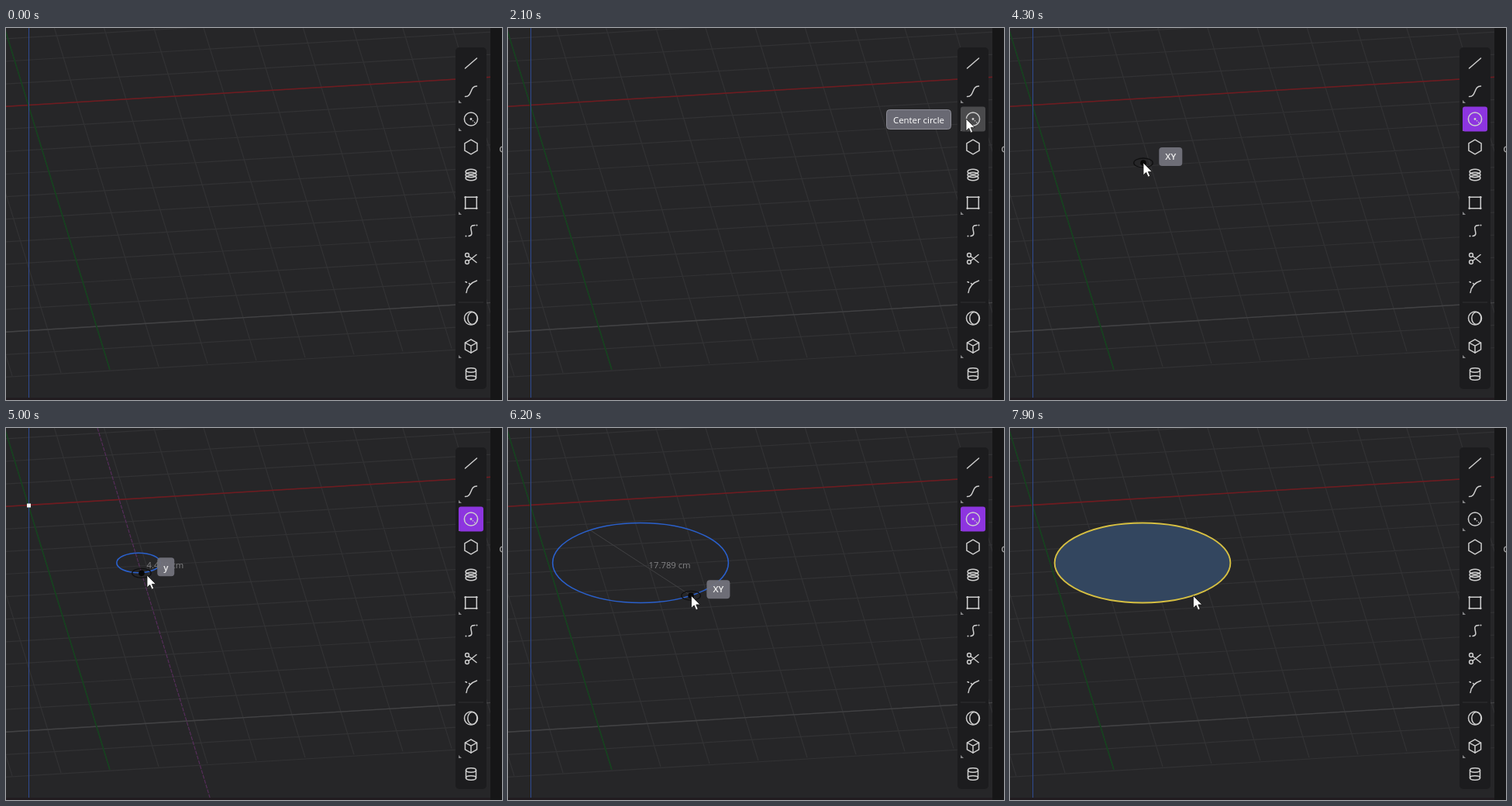
An HTML page for the animation above (8 s loop, 640x480 px).

```html
<!DOCTYPE html>
<html lang="en">
<head>
<meta charset="utf-8">
<title>Center circle tool</title>
<style>
  html, body { margin: 0; width: 100%; height: 100%; overflow: hidden; background: #262628; }
  svg { display: block; width: 100vw; height: 100vh; }
  text { font-family: "Open Sans", "Noto Sans", sans-serif; }
  .icon { fill: none; stroke: #cecece; stroke-width: 1.5; stroke-linecap: round; stroke-linejoin: round; }
  .dot { fill: #cecece; stroke: none; }
</style>
</head>
<body>
<svg viewBox="0 0 640 480">
  <rect width="640" height="480" fill="#262628"/>
  <path id="grid" stroke="#323234" stroke-width="1.2"/>
  <path d="M0 392.3L626 354.4" stroke="#424244" stroke-width="1.4"/>
  <path d="M0 101.2L626 63.3" stroke="#701a1f" stroke-width="1.6"/>
  <path d="M-1.8 0L134 441" stroke="#15431e" stroke-width="1.6"/>
  <path d="M29.5 0V480" stroke="#2f4a92"/>

  <g id="snap">
    <path d="M118 0L264 480" stroke="#592e5d" stroke-width="1.1" stroke-dasharray="5 1.5"/>
    <rect x="27" y="97.5" width="5" height="5" fill="#f2f2f2"/>
  </g>
  <path id="diameter" stroke="#414143"/>
  <ellipse id="circle" cx="171" cy="174"/>
  <text id="size" x="181.5" y="181" font-size="11.3" fill="#838385"/>

  <rect y="477" width="626" height="3" fill="#211c20"/>
  <rect x="625" width="15" height="480" fill="#161617"/>
  <circle cx="641" cy="156.5" r="3.4" fill="none" stroke="#a0a0a0" stroke-width="1.3"/>
  <rect x="580" y="25" width="40" height="441" rx="5" fill="#1c1c1e"/>
  <path d="M584 354H616" stroke="#303032"/>
  <path id="corners" fill="#858587"/>
  <rect id="button" x="584" y="101.5" width="32" height="32" rx="3"/>
  <g id="icons" class="icon"></g>

  <g id="tooltip">
    <rect x="488.5" y="105.5" width="83" height="25" rx="4" fill="#696973" stroke="#8d8d96"/>
    <text x="530" y="122.6" font-size="11.4" fill="#fff" text-anchor="middle">Center circle</text>
  </g>
  <g id="plane">
    <ellipse rx="12.3" ry="6" fill="none" stroke="#101011" stroke-width="1.3"/>
    <circle r="3.8" fill="#070707"/>
    <rect id="tag" x="20.3" y="-20" height="24" rx="4" fill="#71717b" fill-opacity=".96"/>
    <text id="tagText" y="-3.8" font-size="11.5" font-weight="600" fill="#ececec" text-anchor="middle"/>
  </g>
  <path id="cursor" d="M0 0V15.8L3.7 12.4L6.2 18.2L8.7 17.1L6.3 11.4H11.3Z"
        fill="#fff" stroke="#151515" stroke-width=".8"/>
</svg>
<script>
const $ = id => document.getElementById(id);
const show = (id, on) => $(id).style.display = on ? "" : "none";
const set = (id, attrs) => {
  for (const name in attrs) $(id).setAttribute(name, attrs[name]);
};
const LOOP = 8000, STEP = 100, PLANE_LAG = 100;
const CENTER = { x: 171, y: 174 }, PX_PER_CM = 6.375, FLATTEN = 0.4535;

// Floor grid: two families of parallel lines.
let grid = "";
for (let i = -4; i < 10; i++) {
  const x = 134 + 63 * i, y = 441 - 3.95 * i;
  grid += `M${x} ${y}L${x - y * 0.308} 0`;
}
for (let i = -3; i <= 12; i++) {
  const y = 101.2 + 29.1 * i;
  grid += `M0 ${y}L626 ${y - 37.9}`;
}
set("grid", { d: grid });

// Toolbar icons, each drawn around its own centre.
const path = d => `<path d="${d}"/>`;
const oval = (x, y, rx, ry = rx) => `<ellipse cx="${x}" cy="${y}" rx="${rx}" ry="${ry}"/>`;
const dot = (x, y, r = 1) => `<circle class="dot" cx="${x}" cy="${y}" r="${r}"/>`;
const hexagon = r => path(`M0 ${-r}L${r * .87} ${-r / 2}V${r / 2}L0 ${r}L${-r * .87} ${r / 2}V${-r / 2}Z`);
const icons = [
  path("M-7.5 6.5L7.5-6.5"),
  path("M-7.5 7C2 7-2-6.5 7.5-6.5"),
  oval(0, 0, 8.6) + dot(0, 0, 1.4) + dot(2.5, 2.3, .8) + dot(4.7, 4.3, .8),
  hexagon(9.3),
  oval(0, -4, 7, 3.2) + oval(0, 0, 7, 3.2) + oval(0, 4, 7, 3.2),
  path("M-7.3-7.3H7.3V7.3H-7.3Z") + [-7.3, 7.3].map(x => dot(x, -7.3, 1.3) + dot(x, 7.3, 1.3)).join(""),
  path("M5-7C-7-7 7 6-3 7") + dot(7.5, -7) + dot(-6.5, 7),
  oval(-5, -4.5, 2.4) + oval(-5, 4.5, 2.4) + path("M-3-3L7 5M-3 3L7-5"),
  path("M-6 8C-5 1 0-5 7.5-7.5M-7-6L-5.5-5.3M-2.5-4L-1.5-3.2"),
  oval(0, 0, 8.5) + oval(1.8, 0, 6, 8),
  hexagon(8.7) + path("M-7.5-4.3L0-.3L7.5-4.3M0-.3V8.7"),
  oval(0, -5, 6.5, 2.7) + oval(0, 5, 6.5, 2.7) + path("M-6.5-5V5M6.5-5V5")
];
const iconY = i => 45.5 + 36 * i + (i > 8 ? 5 : 0);
$("icons").innerHTML = icons.map((art, i) =>
  `<g transform="translate(600 ${iconY(i)})">${art}</g>`).join("");
set("corners", { d: [1, 2, 5, 10].map(i => `M584 ${iconY(i) + 15.5}v-4l4 4z`).join("") });

// Key points: time in ms, values, and an optional easing into the point.
const easeOut = p => p * (2 - p), linear = p => p;
const cursorPath = [
  [600, [523, 430]], [1400, [569, 136], linear], [1800, [591, 117]], [3400, [591, 117]],
  [4100, [172, 174]], [4400, [172, 174]], [5000, [182, 190], linear],
  [5700, [226, 211]], [6200, [236.5, 216.5]]
];
const radiusPath = [[4400, [0]], [5000, [4.42], linear], [5700, [15.094]], [6200, [17.789]]];

function at(keys, t) {
  const i = keys.findIndex(key => key[0] > t);
  if (i < 1) return keys.at(i)[1];
  const [t0, from] = keys[i - 1], [t1, to, ease = easeOut] = keys[i];
  const p = ease((t - t0) / (t1 - t0));
  return from.map((v, n) => v + (to[n] - v) * p);
}

function render(t) {
  const drawing = t >= 4500 && t < 7500;
  const done = t >= 7600;
  const active = t >= 3500 && !done;
  const snapped = t >= 4800 && t <= 5000;

  const [cx, cy] = at(cursorPath, t);
  const [lagX, py] = at(cursorPath, t - PLANE_LAG);
  const px = snapped ? 118 + py * 0.304 : lagX;
  const [cm] = at(radiusPath, t);
  const radius = cm * PX_PER_CM;

  show("cursor", t >= 600);
  set("cursor", { transform: `translate(${cx} ${cy})` });
  show("button", (t >= 1500 && t < 3500) || active);
  set("button", { fill: active ? "#8d35df" : "#4a4a4c" });
  show("tooltip", t >= 1800 && t < 2700);

  const tagWidth = snapped ? 22 : 30;
  show("plane", t >= 3600 && t < 7500);
  set("plane", { transform: `translate(${px} ${py})` });
  set("tag", { width: tagWidth });
  set("tagText", { x: 20.3 + tagWidth / 2 });
  $("tagText").textContent = snapped ? "y" : "XY";
  show("snap", snapped);

  show("circle", t >= 4500);
  set("circle", {
    rx: radius, ry: radius * FLATTEN,
    fill: done ? "#33465f" : "none",
    stroke: done ? "#d6bf42" : "#2a60cc",
    "stroke-width": done ? 1.9 : 1.6
  });
  show("diameter", drawing && !snapped);
  set("diameter", { d: `M${2 * CENTER.x - px} ${2 * CENTER.y - py}L${px} ${py}` });
  show("size", drawing);
  $("size").textContent = cm.toFixed(3) + " cm";
}

const start = performance.now();
function tick() {
  const t = (performance.now() - start) % LOOP;
  render(Math.floor(t / STEP) * STEP);
  requestAnimationFrame(tick);
}
tick();
</script>
</body>
</html>
```
